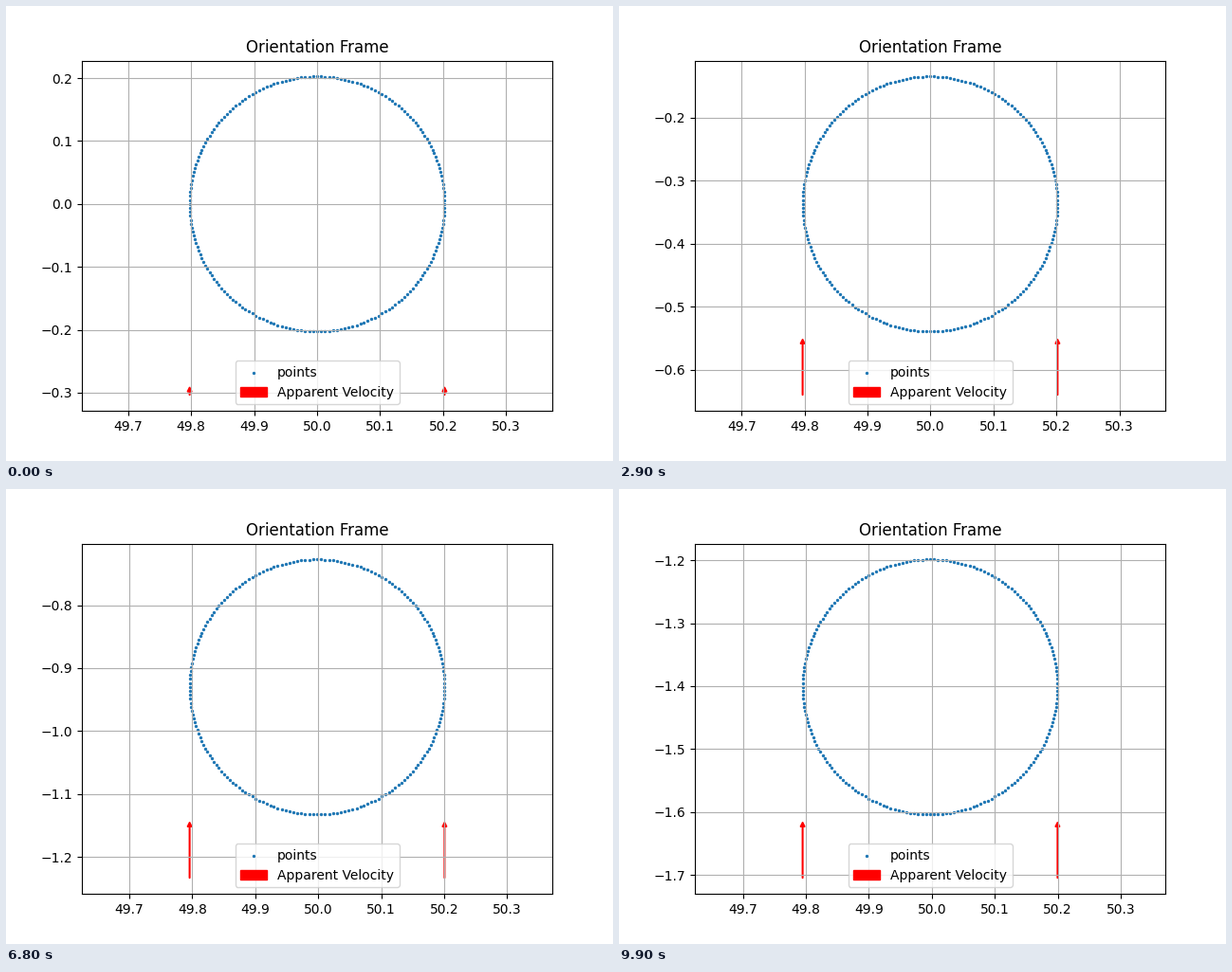
A matplotlib script that plays this animation: 640x480 px, repeating every 10000 ms.

```python
import numpy as np
import matplotlib.pyplot as plt
from matplotlib.animation import FuncAnimation

FRAMES, INTERVAL = 100, 100
R = 0.20244            # circle radius
V_END = 0.015206       # terminal fall per step
V0, ACC = 0.065, 0.0638  # start speed and acceleration, relative to V_END
DRIFT = 0.00193        # sideways drift per unit of fall
ARROW = 0.0815         # arrow shaft length at terminal speed

fig, ax = plt.subplots(figsize=(6.4, 4.8), dpi=100)
ax.set_title("Orientation Frame")
ax.grid(True)

angle = np.linspace(0, 2 * np.pi, 200, endpoint=False)
ring = R * np.column_stack([np.cos(angle), np.sin(angle)])
points = ax.scatter(50 + ring[:, 0], ring[:, 1], s=2, label="points")


def make_arrow(side, **kw):
    return ax.arrow(50 + side * R, -1.5 * R, 0, ARROW, width=0.001,
                    head_width=0.0073, head_length=0.0073, color="r", **kw)


arrows = {-1: make_arrow(-1, label="Apparent Velocity"), 1: make_arrow(1)}
ax.legend(loc="lower center")

HALF_W = 2.75 * R * 496 / 369.6 / 2


def speed(n):
    return min(1.0, V0 + ACC * n)


def fall(n):
    """Distance fallen: constant acceleration, then constant speed."""
    ramp = (1 - V0) / ACC
    t = min(n, ramp)
    return V_END * (V0 * t + ACC * t * t / 2 + max(0, n - ramp))


def update(n):
    cy = -fall(n)
    cx = 50 + DRIFT * cy
    points.set_offsets(ring + [cx, cy])
    for side, arrow in arrows.items():
        arrow.set_data(x=cx + side * R, y=cy - 1.5 * R,
                       dx=0, dy=ARROW * speed(n))
    ax.set_xlim(cx - HALF_W, cx + HALF_W)
    ax.set_ylim(cy - 1.625 * R, cy + 1.125 * R)
    return points, *arrows.values()


anim = FuncAnimation(fig, update, frames=FRAMES, interval=INTERVAL,
                     repeat=True, repeat_delay=0, blit=False)
plt.show()
```
